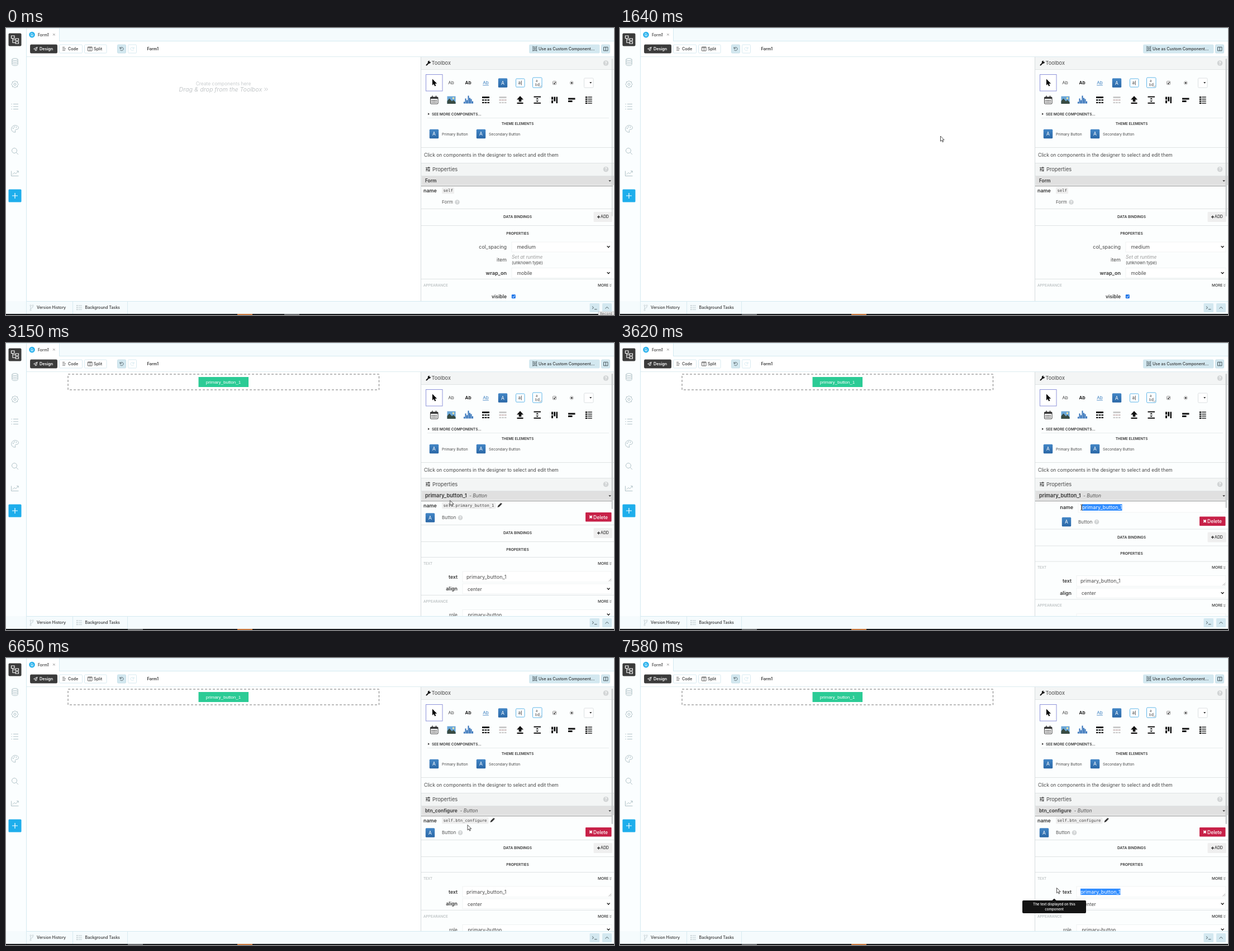
Animation, 1088 px wide and 515 px high, one loop 8 s. Source, as an HTML page:

```html
<!DOCTYPE html>
<html lang="en">
<head>
<meta charset="utf-8">
<title>Form designer</title>
<style>
  html, body { margin: 0; width: 100%; height: 100%; overflow: hidden; background: #fff; }
  svg { display: block; width: 1088px; height: 515px; }
  text { font-family: Inter, "Open Sans", sans-serif; white-space: pre; }
  .mono { font-family: "DejaVu Sans Mono", monospace; }
  .arial { font-family: "Liberation Sans", Arial, sans-serif; }
</style>
</head>
<body>
<svg id="stage" viewBox="0 0 1088 515" xmlns="http://www.w3.org/2000/svg"></svg>
<script>
const LOOP = 8000;
const INK = '#333', SOFT = '#484848', DARK = '#111', LINE = '#dfe3e4', BLUE = '#1eaeec', PALE = '#d3e8f0', ICON = '#a9bcc1';
const BOLD = 'font-weight="600"', MID = 'font-weight="500"', ITALIC = 'font-style="italic"';
const CENTER = 'text-anchor="middle"', END = 'text-anchor="end"';

// Drawing helpers; text is placed by its vertical centre.
const text = (x, y, size, str, more = '', fill = more.includes('weight') ? INK : SOFT) =>
  `<text x="${x}" y="${y + size * .36}" font-size="${size}" fill="${fill}" ${more}>${str}</text>`;
const rect = (x, y, w, h, fill, more = '') =>
  `<rect x="${x}" y="${y}" width="${w}" height="${h}" fill="${fill}" ${more}/>`;
const line = (d, color = LINE, width = 1, more = '') =>
  `<path d="${d}" fill="none" stroke="${color}" stroke-width="${width}" ${more}/>`;
const shape = (d, fill = DARK, more = '') => `<path d="${d}" fill="${fill}" ${more}/>`;
const circle = (x, y, r, fill, more = '') => `<circle cx="${x}" cy="${y}" r="${r}" fill="${fill}" ${more}/>`;
const at = (x, y, body, more = '') => `<g transform="translate(${x} ${y})" ${more}>${body}</g>`;
const group = (id, body, more = '') => `<g id="${id}" ${more}>${body}</g>`;
const rule = (y, color) => line(`M742.5 ${y}H1088`, color);
const stroke = (color, width = 1) => `stroke="${color}" stroke-width="${width}"`;

const help = (x, y, r = 4.8) => circle(x, y, r, '#d2d5d6') + text(x, y, r * 1.55, '?', BOLD + CENTER, '#fff');
const chevron = y => line(`M1075.6 ${y - 1.4}l2.5 2.6 2.5-2.6`, DARK, 1.3);
const blueButton = (x, y) => rect(x - 8.2, y - 8.2, 16.4, 16.4, 'url(#blue)', 'rx="1.5"') +
  text(x, y, 8.5, 'A', CENTER, '#fff');
const more = y => text(1059, y, 6.6, 'MORE', MID) +
  line(`M1080 ${y - 2}l1.7 1.6 1.7-1.6M1080 ${y + .7}l1.7 1.6 1.7-1.6`, '#555', .8);
const field = (x, y, h) => rect(x, y, 1084 - x, h, '#fff', stroke('#edf0f1', .8));
const grip = y => line(`M1078.5 ${y}l4.5-4.5M1081 ${y}l2-2`, '#888', .7);

function sidebar() {
  const hub = line('M-6.5-7h5.5v4.500h-5.500zM1-2h5.500v3.500h-5.500zM1 3.500h5.500V7h-5.500zM-4-2.500v7.700h5M-4 0h5', '#fff', 1.1);
  const db = '<ellipse cy="-4.5" rx="5.2" ry="2"/><path d="M-5.2-4.5v9c0 2.7 10.4 2.7 10.4 0v-9M-5.2-1.5c0 2.7 10.4 2.7 10.4 0M-5.2 1.5c0 2.7 10.4 2.7 10.4 0"/>';
  let gear = '';
  for (let i = 0; i < 16; i++) {
    const a = i * Math.PI / 8, r = i % 2 ? 5 : 6.4;
    gear += (i ? 'L' : 'M') + (r * Math.cos(a)).toFixed(1) + ' ' + (r * Math.sin(a)).toFixed(1);
  }
  const icons = [
    db,
    `<path d="${gear}Z"/><circle r="2"/>`,
    '<path d="M-3-4.5h9M-3 0h9M-3 4.5h9M-6.5-4.5h1.5M-6.5 0h1.5M-6.5 4.5h1.5"/>',
    '<path d="M1 6C-9 7-8-6 0-6.3c8 0 8 7.3 3 7.3-3 0-3 2-2 5z"/><circle cx="-3" cy="-1" r=".6"/><circle cx="-1" cy="-3.5" r=".6"/><circle cx="2.5" cy="-3" r=".6"/>',
    '<circle cx="-1" cy="-1" r="4.5"/><path d="M2.3 2.3L6 6"/>',
    '<path d="M-6.5-4.5v9h13M-4.5 2l3.5-3.5 2.5 2L6-4M3-4.3h3.2v3"/>'
  ];
  return rect(0, 0, 36, 513, '#fbfeff') + line('M36.5 0V513', '#d4eaf1') +
    rect(4.5, 9.5, 23, 23, '#3b3b3b', 'rx="2"') + at(16, 21, hub) +
    icons.map((d, i) => at(16, 61 + 40 * i, d, `fill="none" ${stroke(ICON, .9)}`)).join('') +
    rect(4.5, 289.5, 23, 23, BLUE, 'rx="1.5"') + line('M16 296v10M11 301h10', '#fff', 1.2);
}

function topBars() {
  const tab = (x, w, fill, edge) => rect(x, 30, w, 15, fill, 'rx="1.5" ' + stroke(edge, .9));
  return rect(37, 0, 1051, 23, '#f4fbfd') + line('M0 .5H1088', '#d4eaf1', .8) + line('M37 23.5H1088', '#d4eaf1') +
    rect(37, 1, 58, 23, '#fff') + line('M95.5 0V23', '#d4eaf1') +
    circle(46.5, 12, 5.2, BLUE) + line('M44.7 9.5h2.5l1.3 1.3v3.7h-3.8zM45.5 12h2M45.5 13.3h2', '#fff', .7) +
    text(57, 12, 7, 'Form1', MID) + line('M84 10l3.6 3.6M87.6 10L84 13.6', '#888', .8) +
    tab(43.5, 48, '#3b3b3b', '#3b3b3b') + line('M49.5 37.5l6.5-3.3-1.5 6.5-2-2zM52.5 38.7l3.5-4.5M52.5 38.7v2.5', '#fff', .8) +
    text(60, 37.5, 7.2, 'Design', BOLD, '#fff') +
    tab(95.5, 41, '#fff', PALE) + line('M101 34.5h4M101 37.2h6M101 40h5', '#555', .9) + text(111, 37.5, 7.2, 'Code', MID) +
    tab(140.5, 39.5, '#fff', PALE) + line('M146.5 34h7.5v7h-7.5zM150.3 34v7M146.5 35h7.5', '#555', .9) + text(157, 37.5, 7.2, 'Split', MID) +
    tab(199.5, 15, PALE, '#c3dde7') + line('M204 34v3h3M204.3 36.5c2-3.5 6-1.5 5.7 1.2-.4 3-4 3.8-5.8 1.5', '#4c5b60', .9) +
    tab(218.5, 15, '#fff', PALE) + line('M229 34v3h-3M228.7 36.5c-2-3.5-6-1.5-5.7 1.2.4 3 4 3.8 5.8 1.5', PALE, .9) +
    text(252.5, 37.5, 7.2, 'Form1', BOLD) +
    tab(936.5, 125.5, PALE, PALE) + line('M943 34h6.5v6.5H943zM945 36h2.5v2.5H945zM942 33h1.5M949 33h1.5M942 41h1.5M949 41h1.5', '#3c4a50', .8) +
    text(953, 37.5, 7.2, 'Use as Custom Component...', MID) +
    tab(1065.5, 15, PALE, '#c3dde7') + line('M1069.5 34.3h7.5v6.5h-7.5zM1073.2 34.3v6.5', '#3c4a50', .9) +
    line('M37 51.5H1088', '#dcebf0');
}

function bottomBar() {
  return rect(0, 490, 1088, 23, '#f5fbfd') + line('M37 490.5H1088', '#d4eaf1') +
    line('M36.5 490V513M119.5 490V513M217.5 490V513', '#d9eaf0') +
    line('M44 499v6M48 499v2c0 2-4 1-4 3', '#bccace', .8) +
    [[44, 498], [48, 498], [44, 506]].map(p => circle(...p, 1.2, '#fff', stroke('#bccace', .7))).join('') +
    text(55, 501.7, 7.1, 'Version History', MID) +
    [498, 501.5, 505].map(y => rect(126, y - .8, 2.5, 2, '#c7d2d5') + rect(129.5, y - .8, 6.5, 2, '#d8e1e4')).join('') +
    text(141.5, 501.7, 7.1, 'Background Tasks', MID) +
    rect(1044.5, 494, 17.5, 16, PALE, 'rx="1.5"') + line('M1049 499.5l2.5 2.3-2.5 2.3M1053 504.8h4.5', '#3c4a50', .9) +
    rect(1067, 494, 17, 16, PALE, 'rx="1.5"') + line('M1072.5 503.5l3-3 3 3', '#3c4a50', .9) +
    rect(0, 513, 1088, 2, '#16181a') + rect(414, 513, 27, 2, '#c8783c') +
    rect(498, 513, 27, 2, '#686b6d', 'id="task"') +
    group('record', rect(1060, 509, 28, 6, '#f0f0f0', stroke('#aaa', .5)) + text(1063, 513, 6.5, 'Record', '', '#666'));
}

function toolbox() {
  const ab = (x, extra, fill) => text(x, 98.5, 8.2, 'Ab', CENTER + extra, fill);
  const bars = [3, 9, 6, 14, 10, 8, 4].map((h, i) => rect(819 + 2.5 * i, 135.5 - h, 2, h, '#2f6fb7')).join('');
  const table = (x, color) => rect(x - 6.5, 123, 13, 3, color) + [128.2, 132.8].map(y =>
    [0, 4.7, 9.4].map(dx => rect(x - 6.5 + dx, y, 3.6, 2.2, color)).join('')).join('');
  const dots = [0, 1, 2, 3, 4, 5, 6, 7].map(i => rect(761.5 + 2.5 * (i % 4), 129 + 3 * (i >> 2), 1.5, 1.7, INK)).join('');
  const outline = stroke('#5db5e8', 1);
  return rect(743, 52, 345, 22, '#f3f5f5') + rule(74.5) +
    line('M752.5 66.5l4-4', DARK, 2, 'stroke-linecap="round"') + circle(757.3, 61.3, 2.5, DARK) + shape('M757.5 61l.8-3.5 3 3z', '#f3f5f5') +
    text(761.5, 63, 9.2, 'Toolbox') + help(1073.5, 63) +
    rect(751.5, 83.5, 29.5, 29.5, '#fff', stroke('#8e94da', 1)) +
    shape('M763 91.5v11.3l2.6-2.3 1.7 4 2-.9-1.7-3.9h3.5z', '#000') +
    ab(796.5, '') + ab(827, BOLD, DARK) + ab(858.5, ' text-decoration="underline"', '#3b7fc0') + blueButton(889, 98.5) +
    rect(912.5, 91, 15.5, 15, '#fff', 'rx="1.5" ' + outline) + text(916.5, 98.5, 8, 'a') + line('M922.3 94.5v8', DARK, .7) +
    rect(942.5, 89, 16.5, 18, '#fff', 'rx="1.5" ' + outline) + text(948, 95, 6, 'a') + text(947, 101.5, 6, 'bc') + line('M954 98.5v6', DARK, .6) + line('M955 106l3-3M957 106l1.2-1.2', '#777', .6) +
    rect(978.5, 95.5, 6, 6, '#fff', 'rx="1" ' + stroke('#777', .8)) + line('M980 98.5l1.3 1.5 2.2-3', DARK, 1.1) +
    circle(1012.3, 98.5, 3, '#fff', stroke('#999', .8)) + circle(1012.3, 98.5, 1.6, '#333') +
    rect(1034.5, 90, 16.5, 17, '#fff', 'rx="1.5" ' + stroke('#d7dcde', .9)) + shape('M1044.2 97h4l-2 2.8z', INK) +
    rect(759.5, 124, 13.5, 12, '#fff', 'rx="1" ' + stroke(INK, 1)) + rect(759.5, 124, 13.5, 3, INK) + line('M763 121.5v3M769.5 121.5v3', INK, 1.5) + dots +
    rect(789.5, 122.5, 15, 13.5, '#6aa7d8') + circle(800.5, 126, 1.7, '#f4e4a0') + shape('M789.5 136v-5l4-4.5 4.5 5 2.5-2.5 4 4v3z', '#384b42') +
    bars + table(858.5, DARK) + table(889, '#c9c9c9') + line('M882.5 129.3h13', '#d7a9a9', .7) +
    shape('M920 122l6 6.5h-3.7v3.8h-4.6v-3.8H914zM914.5 133.7h11v2.2h-11z') +
    shape('M944.5 122.5h12.5v2h-12.5zM944.5 133.8h12.5v2h-12.5zM950.7 125.5l2.5 2.5h-5zM950.7 132.8l2.5-2.5h-5z') +
    rect(976, 123.5, 3, 5, DARK) + rect(976, 130, 3, 5, DARK) + rect(980.2, 123.5, 3, 8, DARK) + rect(984.5, 123.5, 2.5, 11.5, DARK) +
    rect(1006, 125.5, 12.5, 3, DARK) + rect(1006, 130, 7.5, 3, DARK) +
    [123, 126.6, 130.2, 133.8].map(y => rect(1036.8, y, 3.5, 2.3, DARK) + rect(1041.3, y + .3, 7.5, 1.4, DARK)).join('') +
    shape('M755.2 152.3l2.8 2-2.8 2z', INK) + text(762, 154.5, 6.55, 'SEE MORE COMPONENTS...', BOLD) +
    line('M754 161.5H1079', '#e4e8e9', .8) + text(915.5, 171.5, 6.3, 'THEME ELEMENTS', BOLD + CENTER) +
    blueButton(766, 190) + text(780, 190.5, 6.65, 'Primary Button') +
    blueButton(850, 190) + text(864, 190.5, 6.65, 'Secondary Button') +
    rule(214.5) + text(748, 228, 8.5, 'Click on components in the designer to select and edit them') +
    rule(242.5) + rect(743, 243, 345, 22, '#f3f5f5') + rule(265.5) +
    line('M751 250.5h8M751 253.3h8M751 256h8', INK, .9) + line('M756.5 249.2v2.6M753 252v2.6M757 254.7v2.6', INK, 1.5) +
    text(763, 253.5, 9.3, 'Properties') + help(1073.5, 253.5) +
    rect(743.5, 266, 344.5, 16, '#e0e0e0') + line('M743 283.5H1086', '#8c8c8c') + shape('M1078.3 273.2h4.6l-2.3 2.6z', INK);
}

const bindings = y => rule(y + .5) +
  text(915.5, y + 15, 6.6, 'DATA BINDINGS', BOLD + CENTER) +
  rect(1051.5, y + 6, 33.5, 18, '#efefef', 'rx="1.5"') + line(`M1058 ${y + 15}h5M1060.5 ${y + 12.5}v5`, INK, 1.4) +
  text(1064, y + 15, 6.9, 'ADD', MID) + rule(y + 30.5) +
  text(915.5, y + 44.5, 6.6, 'PROPERTIES', BOLD + CENTER);

function formProps() {
  return text(750, 274, 8.3, 'Form', BOLD) + text(747, 291.5, 8.9, 'name', BOLD) +
    rect(780, 285.5, 22, 12, '#efefef', 'rx="1.5"') + text(782.5, 291.5, 7.2, 'self', 'class="mono"', '#444') +
    text(780, 312.5, 8.2, 'Form', '', '#555') + help(807.5, 312.5, 4.3) + bindings(324) +
    text(896, 392.5, 8.9, 'col_spacing', END) + field(905, 384, 18) + text(914.5, 393, 8.9, 'medium') + chevron(392.5) +
    text(896, 416, 8.9, 'item', END) + text(905, 410.5, 8.36, 'Set at runtime', ITALIC, '#999') + text(905, 421.5, 7.5, '(unknown type)') +
    text(896, 439.5, 9.1, 'wrap_on', BOLD + END) + field(905, 430.5, 18) + text(914.5, 439.5, 8.6, 'mobile') + chevron(439.5) +
    rule(450.5) + text(747, 461.5, 6.6, 'APPEARANCE', '', '#aab0b2') + more(461.5) +
    text(896, 482, 8.6, 'visible', BOLD + END) + rect(904.8, 478.3, 7, 7, '#1a73e8', 'rx="1.2"') + line('M906.3 481.8l1.5 1.7 2.7-3.5', '#fff', 1);
}

const NAME = 'primary_button_1', LOOSE = ' letter-spacing=".06"';

function buttonProps() {
  const title = (id, str, size, x) => group(id, text(750, 274, size, str, BOLD) + text(x, 274, 8.4, '- Button', ITALIC, '#555'));
  const code = (id, str, w) => group(id, rect(780, 285.5, w, 12, '#efefef', 'rx="1.5"') +
    text(782.5, 291.5, 7.2, str, 'class="mono"', '#444') +
    at(780 + w + 7, 291, shape('M-4 4l.9-3 4.3-4.3 2.1 2.1L-1 3.1z', INK) + line('M1.8-3.8l2 2', INK, 1.5)));
  const picked = (id, y) => `<clipPath id="${id}Clip"><rect id="${id}Sel" x="820" y="${y - 6}" width="90" height="12"/></clipPath>` +
    group(id, rect(0, y - 5.8, 73, 11.6, '#2f8cff', `id="${id}Bg"`) + text(0, y, 9, NAME, LOOSE, '#fff'), `clip-path="url(#${id}Clip)"`);
  const body = bindings(326) + rect(1037, 304, 46.5, 16.5, '#c72148', 'rx="1"') +
    line('M1044.3 310l4.4 4.4M1048.7 310l-4.4 4.4', '#fff', 1.9) + text(1051, 312.5, 8.5, 'Delete', MID, '#fff') +
    group('kind', blueButton(759, 313.5) + text(780, 313.5, 8.2, 'Button', '', '#555') + help(813, 313.5, 4.3)) +
    rule(384.5) + text(747, 395.5, 6.3, 'TEXT', '', '#aab0b2') + more(395.5) +
    text(808, 419.5, 8.6, 'text', BOLD + END) + field(817, 410, 19) + text(824, 419.5, 9, NAME, LOOSE) + grip(427.5) +
    picked('drag', 419.5) +
    text(808, 441, 8.9, 'align', BOLD + END) + field(817, 432, 18) + text(826, 441.5, 8.5, 'center') + chevron(441) +
    rule(452.5) + text(747, 463.5, 6.6, 'APPEARANCE', '', '#aab0b2') + more(463.5) +
    text(808, 487.5, 8.4, 'role', END) + field(817, 478.5, 18) + text(826.5, 487.5, 8.6, 'primary-button') + chevron(487);
  return title('oldTitle', NAME, 9.2, 829) + title('newTitle', 'btn_configure', 8.6, 812.5) +
    group('view', text(747, 291.5, 8.9, 'name', BOLD) + code('oldCode', 'self.primary_button_1', 96.5) + code('newCode', 'self.btn_configure', 83.5)) +
    group('edit', text(811, 295, 8.9, 'name', BOLD + END) + field(820, 286, 18) +
      text(827, 295, 9, '', 'id="typed"' + LOOSE) + picked('all', 295) + rect(0, 289.5, .8, 11, DARK, 'id="caret"')) +
    group('body', body);
}

function tooltip() {
  return group('tip', shape('M777 431.8l4 3.5h-8z', '#141414') + rect(720, 435, 114, 23, '#141414', 'rx="2"') +
    text(777, 441.3, 6.2, 'The text displayed on this', MID + CENTER, '#fff') +
    text(777, 450.7, 6.2, 'component', MID + CENTER, '#fff'));
}

function cursors() {
  const edge = stroke('#222', .8) + ' stroke-linejoin="round"';
  return group('cursor',
    group('arrow', shape('M0 0v9.3l2.2-2 1.5 3.4 1.5-.7-1.5-3.2h3z', '#fff', edge)) +
    group('hand', shape('M-1 0c0-1.2 1.7-1.2 1.7 0v4l5 1c1 .2 1.3.8 1.2 1.7l-.7 4-.7 2H.5l-3.3-4.3c-.8-1.3.5-2 1.8-.9z', '#fff', edge) + line('M2.3 4.5v2M4.3 5v1.7', '#222', .6)) +
    group('beam', line('M-2-5c1.3 0 2 .3 2 1v8c0 .7-.7 1-2 1M2-5c-1.3 0-2 .3-2 1v8c0 .7.7 1 2 1', '#222', .8)));
}

document.getElementById('stage').innerHTML =
  `<defs><linearGradient id="blue" x2="0" y2="1"><stop stop-color="#4386c6"/><stop offset="1" stop-color="#2a67a6"/></linearGradient>
   <clipPath id="panelClip"><rect x="742" y="52" width="346" height="438"/></clipPath></defs>` +
  rect(0, 0, 1088, 515, '#fff') + sidebar() + topBars() +
  group('hint', text(389, 100, 8.45, 'Create components here', CENTER, '#c9cdcf') +
    text(309.5, 110, 10.6, 'Drag &amp; drop from the Toolbox', ITALIC, '#c3c7c9') +
    line('M462.5 107.3l2.5 2.7-2.5 2.7M465.7 107.3l2.5 2.7-2.5 2.7', '#c3c7c9', 1)) +
  group('made', rect(344.5, 61, 89.5, 18, '#2bcb95') + text(389, 70, 8, NAME, 'class="arial"' + CENTER, '#fff')) +
  rect(111, 56, 556.5, 28, 'none', 'id="frame" stroke-dasharray="4 3" ' + stroke('#777', 1)) +
  group('panel', rect(742, 52, 346, 438, '#fcfefe') + toolbox() + group('formProps', formProps()) +
    group('buttonProps', buttonProps()) + line('M742.5 52V490', '#d5dcde') +
    rect(1083.6, 55, 2.4, 281, '#c6c9ca', 'id="bar" rx="1"'), 'clip-path="url(#panelClip)"') +
  bottomBar() + tooltip() + cursors();

const el = {};
document.querySelectorAll('#stage [id]').forEach(n => el[n.id] = n);
const show = (id, on) => el[id].setAttribute('display', on ? 'inline' : 'none');
const set = (id, key, value) => el[id].setAttribute(key, value);
const within = (t, a, b) => t >= a && t < b;
const ramp = (t, a, b) => Math.min(1, Math.max(0, (t - a) / (b - a)));

const path = [
  [330, 1075, 505], [550, 806, 226], [750, 806, 226], [1000, 798, 203], [1120, 790, 190], [1550, 573.5, 194],
  [2660, 573.5, 194], [3290, 826, 295], [6600, 826, 295], [6650, 826, 299.5], [6950, 908, 420],
  [7050, 908, 420], [7420, 781.5, 412.5]
];
function pointer(t) {
  const i = path.findIndex(p => p[0] > t);
  if (i < 0) return path[path.length - 1].slice(1);
  if (!i) return path[0].slice(1);
  const a = path[i - 1], b = path[i], u = ramp(t, a[0], b[0]), k = u * u * (3 - 2 * u);
  return [a[1] + (b[1] - a[1]) * k, a[2] + (b[2] - a[2]) * k];
}

const WORD = 'btn_configure';
const keyTime = i => i < 4 ? [4210, 4440, 4540, 4870][i] : 5100 + (i - 4) * 77.5;

for (const [id, x] of [['drag', 824], ['all', 827]]) {
  const label = el[id].querySelector('text');
  label.setAttribute('x', x);
  set(id + 'Bg', 'x', x);
  set(id + 'Bg', 'width', label.getComputedTextLength());
}

function render(t) {
  const button = t >= 2300, editing = within(t, 3500, 5950), renamed = t >= 5950;
  show('record', t < 60);
  set('task', 'x', t < 1250 ? 498 : 218);
  show('hint', t < 1600);
  show('made', t >= 2220);
  show('frame', t >= 2220 && !within(t, 6000, 6230));
  show('formProps', !button);
  show('buttonProps', button);
  show('oldTitle', !renamed);
  show('newTitle', renamed);
  show('oldCode', !renamed);
  show('newCode', renamed);
  show('view', !editing);
  show('edit', editing);
  set('body', 'transform', `translate(0 ${editing ? 7.5 : 0})`);
  set('kind', 'transform', `translate(${editing ? 40 : 0} 0)`);
  show('bar', t < 1650 || t >= 3000);
  set('bar', 'opacity', t < 330 ? .5 : 1);
  set('bar', 'height', !button ? 283 : editing ? 241 : 243);

  let typed = 0;
  while (typed < WORD.length && t >= keyTime(typed)) typed++;
  show('all', !typed);
  el.typed.textContent = WORD.slice(0, typed);
  show('caret', typed > 0);
  if (editing && typed) set('caret', 'x', 827.3 + el.typed.getComputedTextLength());

  const [x, y] = pointer(t);
  set('cursor', 'transform', `translate(${x.toFixed(2)} ${y.toFixed(2)})`);
  const beam = within(t, 3500, 5950) || within(t, 6850, 7330);
  const hand = within(t, 950, 1150) || within(t, 3180, 3500);
  show('cursor', t >= 330);
  show('beam', beam);
  show('hand', hand);
  show('arrow', !beam && !hand);

  const left = Math.max(820, x);
  show('drag', t >= 7050);
  set('dragSel', 'x', left);
  set('dragSel', 'width', Math.max(0, 902 - left));
  set('tip', 'opacity', ramp(t, 7430, 7580));
}

function tick(now) {
  render(now % LOOP);
  requestAnimationFrame(tick);
}
render(0);
requestAnimationFrame(tick);
</script>
</body>
</html>
```
